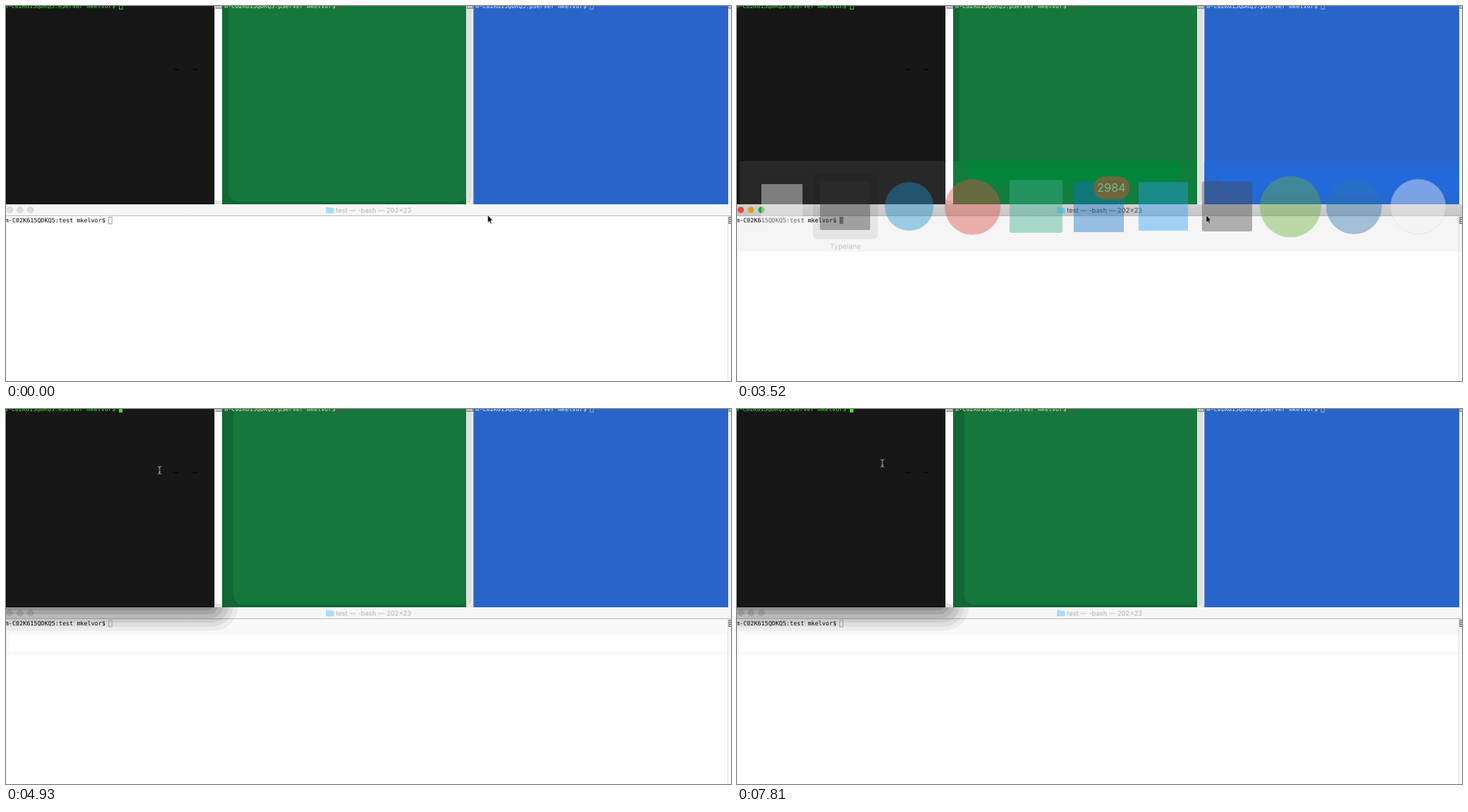
An HTML page that plays this animation: 1040 by 539 pixels, repeating every 8000 ms.

```html
<!DOCTYPE html>
<html lang="en">
<head>
<meta charset="utf-8">
<title>Shell windows</title>
<style>
html, body { margin: 0; width: 100%; height: 100%; overflow: hidden; background: #fefefe; }
svg { display: block; width: 100vw; height: 100vh; }
text { text-rendering: geometricPrecision; font-family: Inter, "Open Sans", sans-serif; }
.mono, .mono text { font: 8.54px "DejaVu Sans Mono", monospace; }
.title { font-size: 9.5px; text-anchor: middle; }
.state { animation: 8s step-end infinite; }

.idle { animation-name: idle; }
.active { animation-name: active; }
.rest { animation-name: rest; }
.after { animation-name: after; }
.middle { animation-name: middle; }
.raised { animation-name: raised; }
.panel { animation-name: panel; }
.ghost { animation-name: ghost; }
.icons { animation-name: icons; }
.caret { animation-name: caret; }
.hollow { animation-name: hollow; }
.solid { animation-name: solid; }
.arrow { animation-name: arrow; }
.hand { animation-name: hand; }
.beam { animation-name: beam; }

@keyframes idle { 0%, 61.625%, 100% { opacity: 1 } 44% { opacity: 0 } }
@keyframes active { 0%, 61.625%, 100% { opacity: 0 } 44% { opacity: 1 } }
@keyframes rest { 0% { opacity: 1 } 48.25%, 100% { opacity: 0 } }
@keyframes after { 0% { opacity: 0 } 48.25%, 100% { opacity: 1 } }
@keyframes middle { 0%, 61.625%, 100% { opacity: 0 } 48.25% { opacity: 1 } }
@keyframes raised { 0% { opacity: 0 } 61.625%, 100% { opacity: 1 } }
@keyframes panel { 0%, 44%, 100% { opacity: 0 } 23.625% { opacity: 1 } }
@keyframes ghost { 0%, 48.25%, 100% { opacity: 0 } 44% { opacity: 1 } }
@keyframes icons { 0%, 48.25%, 100% { opacity: 0 } 23.625% { opacity: 1 } 44% { opacity: .42 } }
@keyframes caret { 0%, 48.25%, 61.625%, 100% { opacity: 0 } 44%, 57.875% { opacity: 1 } }
@keyframes hollow { 0% { opacity: 1 } 61.625%, 100% { opacity: 0 } }
@keyframes solid {
  0%, 70.875%, 80.875%, 91% { opacity: 0 }
  61.625%, 74.125%, 84.25%, 97.625%, 100% { opacity: 1 }
}
@keyframes arrow {
  0% { opacity: 1; transform: translate(691px, 300.5px) }
  20.25%, 48.25%, 100% { opacity: 0; transform: translate(673px, 300.5px) }
  44% { opacity: 1; transform: translate(673px, 300.5px) }
}
@keyframes hand { 0%, 44%, 100% { opacity: 0 } 20.25% { opacity: 1 } }
@keyframes beam {
  0% { opacity: 0; transform: translate(314px, 92px) }
  48.25% { opacity: 1; transform: translate(314px, 92px) }
  57.875% { opacity: 1; transform: translate(220.3px, 88px) }
  65.375% { opacity: 1; transform: translate(210px, 81px) }
  70.875%, 100% { opacity: 1; transform: translate(208.5px, 78px) }
}
</style>
</head>
<body>
<svg viewBox="0 0 1040 539" preserveAspectRatio="none">
  <defs>
    <linearGradient id="across" gradientUnits="userSpaceOnUse" x1="4" y1="0" x2="1037" y2="0">
      <stop offset="0" stop-color="#676566"/>
      <stop offset=".25" stop-color="#646364"/>
      <stop offset=".32" stop-color="#3dab69"/>
      <stop offset=".6" stop-color="#3dab69"/>
      <stop offset=".68" stop-color="#5296f2"/>
      <stop offset="1" stop-color="#5296f2"/>
    </linearGradient>
    <linearGradient id="down" x1="0" y1="0" x2="0" y2="1">
      <stop offset=".18" stop-color="#f0f0f0" stop-opacity="0"/>
      <stop offset=".36" stop-color="#f0f0f0" stop-opacity=".22"/>
      <stop offset=".52" stop-color="#f0f0f0" stop-opacity=".58"/>
      <stop offset=".64" stop-color="#f0f0f0" stop-opacity=".88"/>
      <stop offset=".74" stop-color="#f0f0f0"/>
    </linearGradient>
    <linearGradient id="bar" x1="0" y1="0" x2="0" y2="1">
      <stop offset="0" stop-color="#d9d9d9"/>
      <stop offset="1" stop-color="#cdcdcd"/>
    </linearGradient>
    <clipPath id="below"><rect y="285" width="1040" height="254"/></clipPath>
    <path id="sheet" d="M4 353V241a18 18 0 0 1 18-18H1019a18 18 0 0 1 18 18V353z"/>
    <path id="folder" d="M459 290a1 1 0 0 1 1-1h3l1 1h5.500a1 1 0 0 1 1 1v6a1 1 0 0 1-1 1h-9.500a1 1 0 0 1-1-1z"/>
    <g id="corner">
      <rect x=".5" y="-6" width="8" height="9.500" fill="#ddd" stroke="#777"/>
      <path d="M2 1.500h5" stroke="#999"/>
    </g>
  </defs>

  <rect width="1040" height="539" fill="#fefefe"/>

  <!-- upper windows -->
  <rect width="299" height="285" fill="#171717"/>
  <path d="M0 284.500h299M.5 12v272" stroke="#050505"/>
  <path d="M241 92q2-2 3.500-.8t3.500-.4M268 92q2-2 3.500-.8t3.500-.4" fill="none" stroke="#000" stroke-width="1.200"/>
  <path d="M299 279q7 0 11 3v3h-11z" fill="#e3e3e3"/>
  <use href="#corner" x="300.500"/>

  <rect x="310" width="350" height="285" fill="#15773c"/>
  <path class="state rest" d="M310 0h9v269a12 12 0 0 0 12 12h317q11 0 12-6v10H310z" fill="#126835"/>
  <g class="state middle">
    <path d="M310 0h8v82h16v203H310z" fill="#137139"/>
    <path d="M310 0h4v285h-4z" fill="#126a36"/>
  </g>
  <path class="state raised" d="M310 0h16v267a14 14 0 0 0 14 14h308q11 0 12-6v10H310z" fill="#116735"/>

  <rect x="660" width="10.500" height="285" fill="#dfdfdf"/>
  <path d="M666 0h2v274q0 8-8 11h6q4-4 4-10V0z" fill="#eee"/>
  <use href="#corner" x="661"/>
  <rect x="670.500" width="365.500" height="285" fill="#2965c8"/>
  <rect x="1036" width="4" height="285" fill="#f4f4f4"/>
  <use href="#corner" x="1036.500"/>

  <g class="mono">
    <text x="-2.400" y="3" fill="#2bf51d">m-C02K615QDKQ5:eServer mkelvor$</text>
    <text x="313.300" y="3" fill="#f2e69c">m-C02K615QDKQ5:pServer mkelvor$</text>
    <text x="673.600" y="3" fill="#edf2fa">m-C02K615QDKQ5:pServer mkelvor$</text>
  </g>
  <g fill="none">
    <rect class="state hollow" x="162.500" y="-5" width="4.500" height="9.500" stroke="#2be51d"/>
    <rect x="477.500" y="-5" width="4.500" height="9.500" stroke="#84451f"/>
    <rect x="838" y="-5" width="4.500" height="9.500" stroke="#a2aaa0"/>
  </g>
  <rect class="state solid" x="162" width="5" height="5" fill="#2bf51d"/>

  <!-- lower window -->
  <g class="state after">
    <path d="M0 302H1040V353H0zM4 313V349H1036V313z" fill="#f8f8f8" fill-rule="evenodd"/>
    <path class="state middle" d="M334 302H1036V313H334z" fill="#fdfdfd"/>
    <path class="state raised" d="M4 302H1036V325H4z" fill="#f9f9f9"/>
  </g>
  <g class="state idle">
    <rect y="285" width="1040" height="16.500" fill="#f6f6f6"/>
    <g fill="#dcdcdc" stroke="#cecece">
      <circle cx="5.500" cy="293" r="4.200"/>
      <circle cx="20" cy="293" r="4.200"/>
      <circle cx="35" cy="293" r="4.200"/>
    </g>
    <use href="#folder" fill="#a8ddf6"/>
    <text class="title" x="527.300" y="296.600" fill="#b0b0b0">test — -bash — 202×23</text>
  </g>
  <g class="state active">
    <rect y="285" width="1040" height="16.500" fill="url(#bar)"/>
    <g class="state middle">
      <path d="M0 285H308v9q2 6 8 7.500H0z" fill="#c3c3c3"/>
      <path d="M316 292H1040v8H330q-12 0-14-8z" fill="#dedede"/>
    </g>
    <circle cx="5.500" cy="293" r="4.600" fill="#ee4f4a"/>
    <circle cx="20" cy="293" r="4.600" fill="#e0a52c"/>
    <circle cx="35" cy="293" r="4.600" fill="#2bae3e"/>
    <use href="#folder" fill="#72cdf4"/>
    <text class="title" x="527.300" y="296.600" fill="#474747">test — -bash — 202×23</text>
  </g>
  <path d="M0 301.500H1040" stroke="#bababa"/>
  <path d="M1035.500 302V539" stroke="#dedede"/>
  <rect x="1037" y="303.500" width="8" height="9" fill="#ddd" stroke="#555"/>
  <path d="M1038 306.500h2M1038 309.500h2" stroke="#555"/>

  <g class="state raised" clip-path="url(#below)">
    <rect x="-60" y="200" width="393" height="119" rx="36" fill-opacity=".05"/>
    <rect x="-60" y="200" width="386" height="113" rx="31" fill-opacity=".06"/>
    <rect x="-60" y="200" width="380" height="107" rx="26" fill-opacity=".08"/>
    <rect x="-60" y="200" width="373" height="101" rx="21" fill-opacity=".09"/>
    <rect x="-60" y="200" width="366" height="95" rx="16" fill-opacity=".1"/>
    <rect x="-60" y="200" width="360" height="89" rx="10" fill-opacity=".13"/>
  </g>

  <text class="mono" x="-1.300" y="311.300" fill="#000">m-C02K615QDKQ5:test mkelvor$</text>
  <rect class="state idle" x="147.500" y="303.500" width="4.500" height="9.500" fill="none" stroke="#9a9a9a"/>
  <rect class="state caret" x="147" y="303" width="5.500" height="10.300" fill="#8e8e8e"/>

  <!-- app switcher -->
  <g class="state panel">
    <use href="#sheet" fill="url(#across)"/>
    <path d="M4 236H130q60 6 120 0h30q-8 16-60 16H4z" fill="#565556" fill-opacity=".5"/>
    <path d="M318 228H640q-6 20-40 20H350q-26 0-32-20z" fill="#37a765" fill-opacity=".5"/>
    <path d="M690 228H1037v20H730q-30 0-40-20z" fill="#4a90f1" fill-opacity=".5"/>
    <use href="#sheet" fill="url(#down)"/>
  </g>
  <g class="state ghost">
    <path d="M4 223H299V285H4z" fill="#282828"/>
    <path d="M310 223H660V285H310z" fill="#107d3d"/>
    <path d="M330 223H636q4 34-24 34H356q-28 0-26-34z" fill="#04843a"/>
    <path d="M670.500 223H1036V285H670.500z" fill="#2567d3"/>
    <path d="M690 236H1036V270H720q-24 0-30-34z" fill="#2269dc"/>
    <path d="M0 285H1040V353H0z" fill="#001818" fill-opacity=".035"/>
  </g>
  <g class="state icons">
    <rect x="109" y="242" width="93" height="93" rx="6" fill-opacity=".15"/>
    <rect x="35" y="256" width="59" height="59" fill="#f4f4f4"/>
    <rect x="119" y="252" width="72" height="70" rx="2" fill="#2d2d2e"/>
    <circle cx="247" cy="288" r="35" fill="#1c92d0"/>
    <circle cx="338" cy="289" r="40" fill="#dc5145"/>
    <rect x="391" y="250" width="76" height="76" rx="3" fill="#3eb08f"/>
    <rect x="483" y="253" width="72" height="72" fill="#1273ca"/>
    <rect x="576" y="253" width="71" height="70" rx="2" fill="#2b9ff3"/>
    <rect x="667" y="252" width="72" height="72" rx="3" fill="#4c4c4c"/>
    <circle cx="794" cy="288.500" r="44" fill="#69b03c"/>
    <circle cx="885" cy="288" r="40" fill="#2f76aa"/>
    <circle cx="977" cy="288.500" r="39.500" fill="#f3f3f3" stroke="#cdcdcd"/>
    <rect x="511.500" y="245" width="52" height="33" rx="16.500" fill="#f4453d"/>
    <text x="537" y="267.300" font-size="16.500" text-anchor="middle" fill="#fff">2984</text>
    <text x="155.700" y="349" font-size="10.400" text-anchor="middle" fill="#808080">Typelane</text>
  </g>

  <!-- pointers -->
  <path class="state arrow" d="M0 0V11l2.500-2.200 1.700 3.800 1.700-.8-1.700-3.700h3.300z" fill="#000" stroke="#fff" stroke-width=".7"/>
  <path class="state hand" d="M691 309v-5.500q0-1.500 1-1.500t1.200 1.500v2.800q1.800-.8 2 .5 1.500-.6 1.800.6 1.600-.2 1.500 1.300-.2 2.500-1.300 5h-5.200q-1-2-3.300-4.200-.8-1 .2-1.400 1-.2 2.100 1z" fill="#fff" stroke="#000" stroke-width=".9"/>
  <path class="state beam" d="M-2.500-5.500Q0-5.500 0-3.500 0-5.500 2.500-5.500M0-4V4M-2.500 5.500Q0 5.500 0 3.500 0 5.500 2.500 5.500M-1.200 2.500h2.400" fill="none" stroke="#b4b4b4"/>
</svg>
</body>
</html>
```
